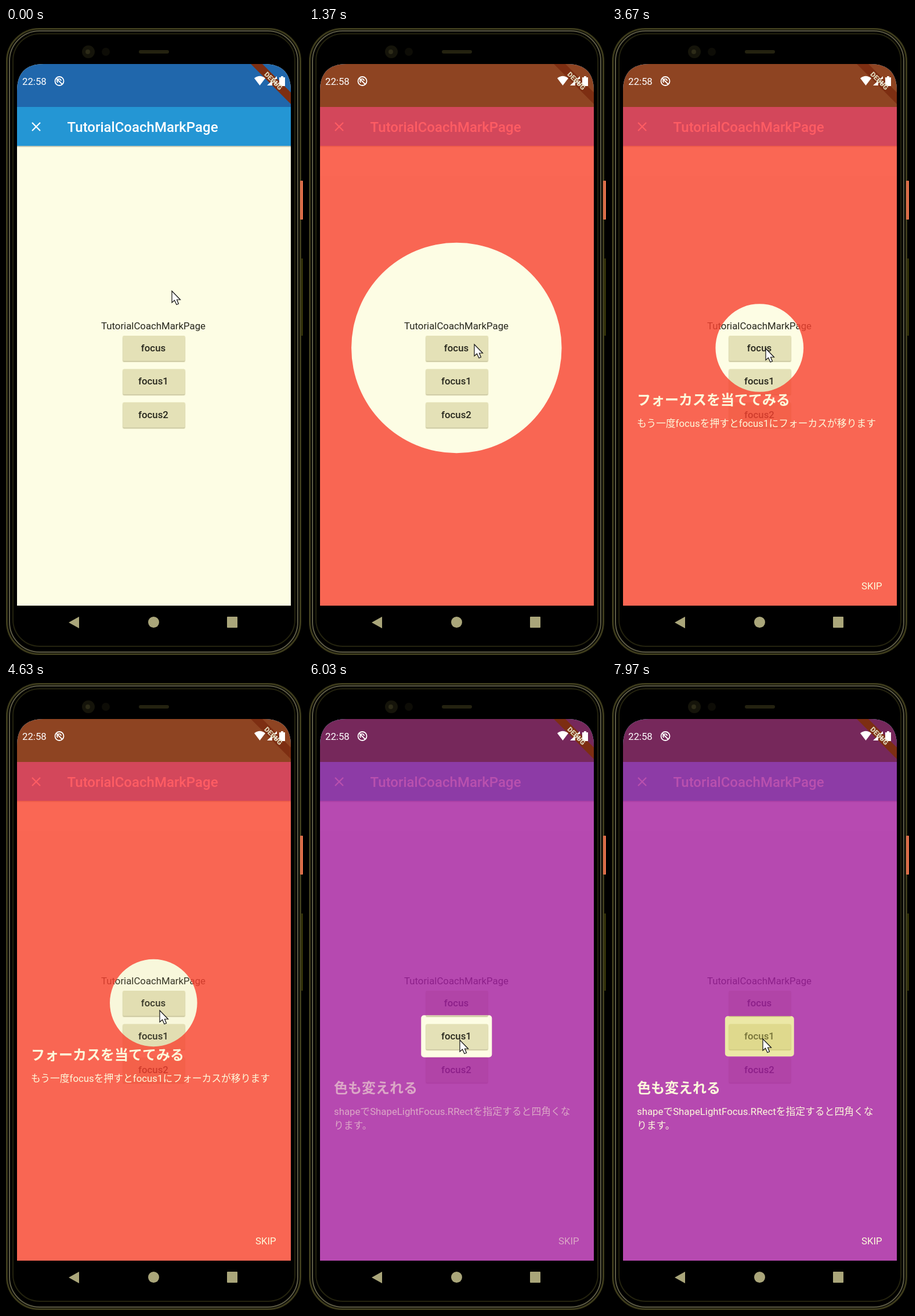
Recreate the animation shown at these times as an HTML page. Size 512 px wide and 1080 px high, loop 8 s.

```html
<!DOCTYPE html>
<html lang="ja">
<head>
<meta charset="utf-8">
<title>Coach mark tutorial</title>
<style>
html, body { margin: 0; width: 100%; height: 100%; overflow: hidden; background: #000; }
svg { display: block; width: 100%; height: 100%; }
text { font: 16.8px Roboto, "Noto Sans CJK JP", "Noto Sans CJK", sans-serif; }
.mid { text-anchor: middle; fill: #26261c; }
.label { font-weight: 500; }
.head { font-size: 24px; font-weight: 700; }
.tip { fill: #fcfadb; }
</style>
</head>
<body>
<svg viewBox="0 0 512 1080">
  <defs>
    <clipPath id="screen"><path d="M19 995V108Q19 62 65 62H445Q491 62 491 108V995Z"/></clipPath>
    <clipPath id="hole"><path id="holeShape"/></clipPath>
    <clipPath id="shade"><path id="shadeShape" clip-rule="evenodd"/></clipPath>
  </defs>

  <!-- phone body -->
  <rect width="512" height="1080"/>
  <g fill="none">
    <rect x="1.5" y="1.5" width="506" height="1077" rx="56" stroke="#3d3b1c" stroke-width="3"/>
    <rect x="6" y="5" width="497" height="1070" rx="52" stroke="#5d5b45" stroke-width="2"/>
    <rect x="12" y="10" width="486" height="1055" rx="46" stroke="#24230f" stroke-width="2"/>
  </g>
  <rect x="507" y="263" width="5" height="67" rx="1" fill="#d96c48"/>
  <rect x="509" y="397" width="3" height="133" fill="#302f08"/>
  <circle cx="142" cy="41" r="11" fill="#15140a"/>
  <circle cx="141" cy="41" r="4" fill="#2d2b18"/>
  <circle cx="172" cy="41" r="7" fill="#0d0c06"/>
  <rect x="229" y="38" width="52" height="6" rx="3" fill="#242210"/>
  <g fill="#aaa67a">
    <path d="M108 1024L126 1014V1034Z"/>
    <circle cx="254.5" cy="1023.5" r="9.5"/>
    <rect x="381" y="1014" width="18" height="19" rx="1"/>
  </g>

  <g clip-path="url(#screen)">
    <!-- page -->
    <rect x="19" y="62" width="472" height="933" fill="#fdfde4"/>
    <rect x="19" y="203" width="472" height="2" fill="#c9cbb5"/>
    <rect x="19" y="62" width="472" height="74" fill="#2067ac"/>
    <rect x="19" y="136" width="472" height="67" fill="#2496d4"/>
    <path d="M45 163L59 177M59 163L45 177" stroke="#fff" stroke-width="2.2"/>
    <text x="105.5" y="178.5" class="label" style="font-size:24px" fill="#fff">TutorialCoachMarkPage</text>
    <text x="254" y="519" class="mid">TutorialCoachMarkPage</text>
    <g id="buttons"></g>

    <!-- touch highlight -->
    <rect id="press" x="19" y="205" width="472" height="790" clip-path="url(#hole)"/>

    <!-- coloured shade around the hole -->
    <g clip-path="url(#shade)"><g opacity=".8">
      <rect id="shadeStatus" x="19" y="62" width="472" height="74"/>
      <rect id="shadeBar" x="19" y="136" width="472" height="67"/>
      <rect id="shadeBody" x="19" y="203" width="472" height="792"/>
    </g></g>

    <g id="tip1" class="tip">
      <text x="43" y="649" class="head">フォーカスを当ててみる</text>
      <text x="43" y="687">もう一度focusを押すとfocus1にフォーカスが移ります</text>
      <text x="430" y="967">SKIP</text>
    </g>
    <g id="tip2" class="tip">
      <text x="43" y="706" class="head">色も変えれる</text>
      <text x="43" y="744">shapeでShapeLightFocus.RRectを指定すると四角くな</text>
      <text x="43" y="768">ります。</text>
      <text x="430" y="967">SKIP</text>
    </g>

    <!-- status bar -->
    <path d="M422 62H442L491 111V131Z" fill="#7d2e12"/>
    <g fill="#fff">
      <text x="28" y="98">22:58</text>
      <path d="M437.5 99L428 86.5Q437.5 79 447 86.5Z"/>
      <path d="M450 99L467 83V88H459V99Z"/>
      <path d="M462 92L468 98M468 92L462 98" stroke="#fff" stroke-width="1.5"/>
      <path d="M471 85H474V83H478V85H481V100H471Z"/>
    </g>
    <g fill="none" stroke="#fff" stroke-width="1.8">
      <circle cx="92" cy="91.5" r="7.5"/>
      <path d="M87 87L97 97M89.5 94A3.5 3.5 0 1 1 95 91"/>
    </g>
    <text transform="translate(461 91) rotate(45)" y="4.2" text-anchor="middle"
      style="font-size:12px;font-weight:900" fill="#ddd6b8">DEBUG</text>
  </g>

  <path id="cursor" d="M0 0V20L4.5 16L8 23.5L11.5 22L8.5 15H14.5Z" fill="#fff" stroke="#111" stroke-width="1.2"/>
</svg>

<script>
const LOOP = 8000, SIDE = 933, CX = 254.3;
const FOCUS = 600, PULSE = 505, FADE = 300;
const $ = id => document.getElementById(id);
const set = (id, attrs) => { for (const k in attrs) $(id).setAttribute(k, attrs[k]); };
const unit = x => Math.max(0, Math.min(1, x));

// shade colours: status bar, app bar, body
const steps = [
  { start: 1010, end: 4660, y: 551, r: 75.2, colors: ["#ab3c00", "#ff343c", "#f94130"] },
  { start: 5272, end: Infinity, y: 608.5, w: 117, h: 67.5, colors: ["#8c1948", "#a8259a", "#a61da4"] }
];

// cursor stops: time, x, y
const path = [
  [0, 286, 453], [500, 286, 453], [900, 285, 545], [1500, 285, 545], [2000, 265, 552],
  [3900, 265, 552], [4300, 265, 564], [4700, 265, 564], [5200, 265, 581],
  [5300, 265, 581], [5900, 260, 615], [7200, 260, 615], [7600, 260, 613], [LOOP, 260, 613]
];

$("buttons").innerHTML = ["focus", "focus1", "focus2"].map((name, i) => {
  const y = 530 + i * 57.4;
  return `<rect x="200.5" y="${y}" width="109" height="46" rx="3" fill="#efedc9"/>
    <rect x="201.5" y="${y + 2}" width="107" height="43" rx="2.5" fill="#c9c6a2"/>
    <rect x="201.5" y="${y}" width="107" height="43.5" rx="2.5" fill="#e4e1b7"/>
    <text x="254" y="${y + 27}" class="mid label">${name}</text>`;
}).join("");

// cubic-bezier(.25, .1, .25, 1)
function ease(x) {
  x = unit(x);
  let lo = 0, hi = 1;
  const at = (u, a, b) => 3 * u * (1 - u) * (1 - u) * a + 3 * u * u * (1 - u) * b + u * u * u;
  for (let i = 0; i < 24; i++) {
    const m = (lo + hi) / 2;
    if (at(m, .25, .25) < x) lo = m; else hi = m;
  }
  return at(lo, .1, 1);
}

// how far the hole is open beyond its resting size
function spread(s, t) {
  if (t >= s.end) return SIDE * (1 - ease(1 - (t - s.end) / FOCUS));
  const u = t - s.start;
  if (u < FOCUS) return SIDE * (1 - ease(u / FOCUS));
  const k = (u - FOCUS) / PULSE % 2;
  return SIDE * .01 * ease(k < 1 ? k : 2 - k);
}

function holePath(s, grow) {
  const box = (w, h, r) =>
    `M${CX - w / 2 + r} ${s.y - h / 2}h${w - 2 * r}a${r} ${r} 0 0 1 ${r} ${r}v${h - 2 * r}` +
    `a${r} ${r} 0 0 1 ${-r} ${r}h${2 * r - w}a${r} ${r} 0 0 1 ${-r} ${-r}v${2 * r - h}` +
    `a${r} ${r} 0 0 1 ${r} ${-r}z`;
  if (!s.r) return box(s.w + grow, s.h + grow, 5);
  const r = s.r + grow;
  return box(2 * r, 2 * r, r);
}

function moveCursor(t) {
  const i = path.findIndex(p => p[0] > t);
  const [a, b] = [path[i - 1], path[i]];
  const k = (t - a[0]) / (b[0] - a[0]), e = k * k * (3 - 2 * k);
  set("cursor", { transform: `translate(${a[1] + (b[1] - a[1]) * e} ${a[2] + (b[2] - a[2]) * e})` });
}

function draw(t) {
  const s = steps.find(s => t >= s.start && t < s.end + FOCUS);
  const hole = s ? holePath(s, spread(s, t)) : "";
  set("holeShape", { d: hole });
  set("shadeShape", { d: s ? "M0 0H512V1080H0Z" + hole : "" });
  if (s) ["shadeStatus", "shadeBar", "shadeBody"].forEach((id, i) => set(id, { fill: s.colors[i] }));
  steps.forEach((s, i) => set("tip" + (i + 1), {
    opacity: unit((t - s.start - FOCUS) / FADE) * (1 - unit((t - s.end) / FADE))
  }));
  const late = t > 7000;
  set("press", {
    fill: late ? "#d8cf5a" : "#c8c48c",
    opacity: late ? .45 * unit((t - 7870) / 90) : .15 * unit((t - 4590) / 60) * (1 - unit((t - 4660) / 150))
  });
  moveCursor(t);
}

const begin = performance.now();
function tick() {
  draw((performance.now() - begin) % LOOP);
  requestAnimationFrame(tick);
}
tick();
</script>
</body>
</html>
```
